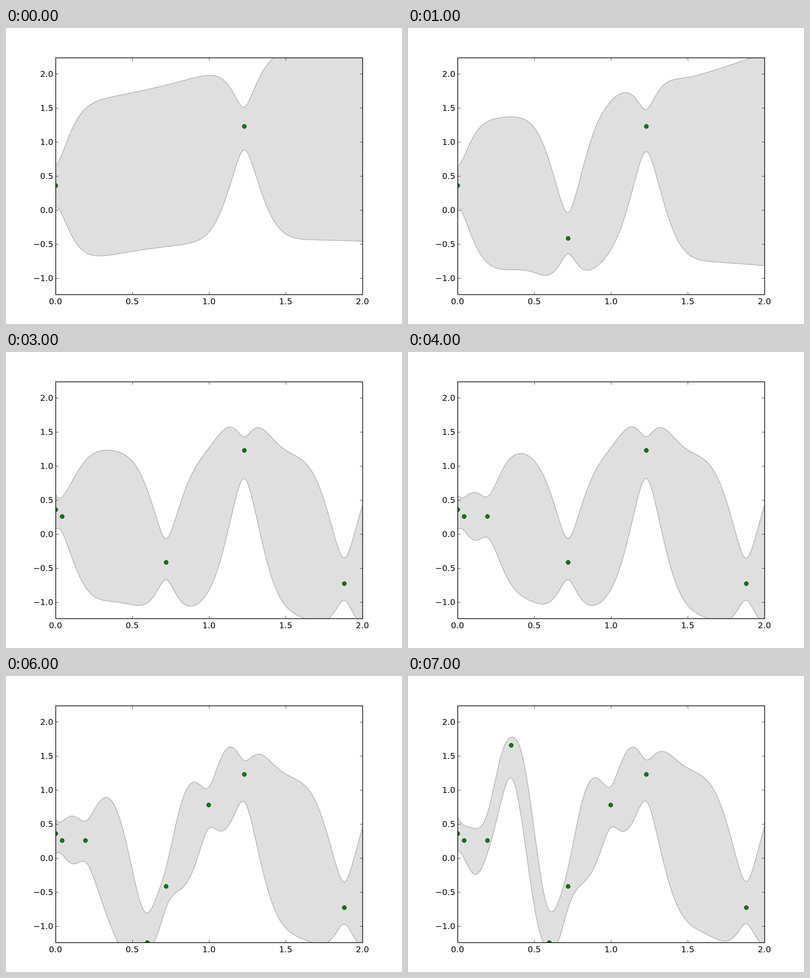
Animation of 800x600 px, one loop 8000 ms. Source, as an HTML page with a canvas:

```html
<!DOCTYPE html>
<html lang="en">
<head>
<meta charset="utf-8">
<title>Gaussian process regression</title>
<style>
  html, body { margin: 0; width: 100%; height: 100%; overflow: hidden; background: #fff; }
  canvas { display: block; }
</style>
</head>
<body>
<canvas id="plot" width="800" height="600"></canvas>
<script>
const ctx = document.getElementById('plot').getContext('2d');
const STEP_MS = 1000, FIRST_COUNT = 2, NOISE = 0.1;
const LEFT = 100, TOP = 60, WIDTH = 620, HEIGHT = 480;

// Observations in the order they are added.
const points = [
  [0, 0.362], [1.229, 1.232], [0.7195, -0.413], [1.881, -0.725], [0.042, 0.261],
  [0.1935, 0.261], [0.997, 0.783], [0.597, -1.239], [0.348, 1.659]
];
const steps = points.length - FIRST_COUNT + 1;

const px = x => LEFT + 310 * x;
const py = y => 369 - 138 * y;

// Linear trend plus squared exponential with length scale 1/8.
const kernel = (a, b) => 1 + a * b + Math.exp(-32 * (a - b) ** 2);

function cholesky(xs) {
  const L = xs.map(() => []);
  xs.forEach((a, i) => {
    for (let j = 0; j <= i; j++) {
      let sum = kernel(a, xs[j]) + (i === j ? NOISE : 0);
      for (let k = 0; k < j; k++) sum -= L[i][k] * L[j][k];
      L[i][j] = i === j ? Math.sqrt(sum) : sum / L[j][j];
    }
  });
  return L;
}

function forwardSolve(L, b) {
  const z = [];
  L.forEach((row, i) => {
    let sum = b[i];
    for (let k = 0; k < i; k++) sum -= row[k] * z[k];
    z.push(sum / row[i]);
  });
  return z;
}

const dot = (a, b) => a.reduce((sum, v, i) => sum + v * b[i], 0);

// Posterior mean plus and minus one standard deviation.
function posteriorBand(count) {
  const seen = points.slice(0, count);
  const xs = seen.map(p => p[0]);
  const L = cholesky(xs);
  const target = forwardSolve(L, seen.map(p => p[1]));
  const upper = [], lower = [];
  for (let i = 0; i <= 400; i++) {
    const x = i / 200;
    const z = forwardSolve(L, xs.map(a => kernel(a, x)));
    const mean = dot(z, target);
    const sd = Math.sqrt(kernel(x, x) - dot(z, z));
    upper.push([px(x), py(mean + sd)]);
    lower.push([px(x), py(mean - sd)]);
  }
  return { upper, lower };
}

const bands = Array.from({ length: steps }, (_, i) => posteriorBand(FIRST_COUNT + i));

function trace(path) {
  path.forEach(([x, y]) => ctx.lineTo(x, y));
}

function drawBand({ upper, lower }) {
  ctx.beginPath();
  trace(upper);
  trace([...lower].reverse());
  ctx.fillStyle = '#dfdfdf';
  ctx.fill();
  ctx.strokeStyle = '#afafaf';
  ctx.lineWidth = 1.39;
  ctx.lineJoin = 'round';
  for (const edge of [upper, lower]) {
    ctx.beginPath();
    trace(edge);
    ctx.stroke();
  }
}

function drawPoint([x, y]) {
  ctx.beginPath();
  ctx.arc(Math.round(px(x)) + 0.5, Math.round(py(y)) + 0.5, 4.17, 0, 2 * Math.PI);
  ctx.fillStyle = '#008000';
  ctx.fill();
  ctx.strokeStyle = '#000';
  ctx.lineWidth = 0.69;
  ctx.stroke();
}

function tick(x, y, dx, dy) {
  ctx.beginPath();
  ctx.moveTo(x, y);
  ctx.lineTo(x + dx, y + dy);
  ctx.stroke();
}

function drawAxes() {
  const x0 = LEFT + 0.5, y0 = TOP + 0.5, x1 = x0 + WIDTH, y1 = y0 + HEIGHT;
  const size = 5.56;
  ctx.strokeStyle = ctx.fillStyle = '#000';
  ctx.font = '16.67px "DejaVu Sans", sans-serif';
  ctx.lineWidth = 0.69;

  ctx.textAlign = 'center';
  for (let v = 0; v <= 2; v += 0.5) {
    const x = px(v) + 0.5;
    tick(x, y1, 0, -size);
    tick(x, y0, 0, size);
    ctx.fillText(v.toFixed(1), x - 0.5, 560);
  }
  ctx.textAlign = 'right';
  for (let v = -1; v <= 2; v += 0.5) {
    const y = py(v) + 0.5;
    tick(x0, y, size, 0);
    tick(x1, y, -size, 0);
    ctx.fillText(v.toFixed(1).replace('-', '\u2212'), 95.5, y + 5.5);
  }
  ctx.lineWidth = 1.39;
  ctx.strokeRect(x0, y0, WIDTH, HEIGHT);
}

function draw(time) {
  const step = Math.floor(time / STEP_MS) % steps;
  ctx.fillStyle = '#fff';
  ctx.fillRect(0, 0, 800, 600);
  ctx.save();
  ctx.beginPath();
  ctx.rect(LEFT, TOP, WIDTH, HEIGHT);
  ctx.clip();
  drawBand(bands[step]);
  points.slice(0, FIRST_COUNT + step).forEach(drawPoint);
  ctx.restore();
  drawAxes();
}

const start = performance.now();
function frame() {
  draw(performance.now() - start);
  requestAnimationFrame(frame);
}
frame();
</script>
</body>
</html>
```
